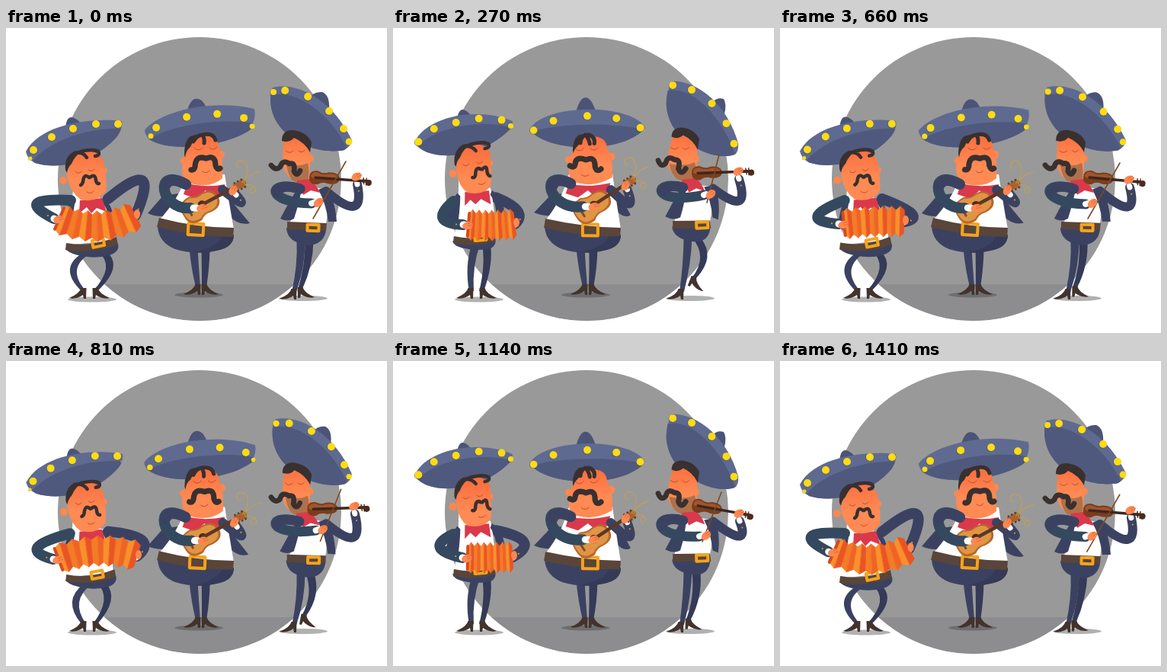
Animation of 500 by 400 pixels, one loop 1440 ms. Source, as an HTML page with a canvas:

```html
<!DOCTYPE html>
<html lang="en">
<head>
<meta charset="utf-8">
<title>Mariachi trio</title>
<style>
html, body { margin: 0; height: 100%; overflow: hidden; background: #fff; }
canvas { display: block; }
</style>
</head>
<body>
<canvas id="stage" width="500" height="400"></canvas>
<script>
const ctx = document.getElementById('stage').getContext('2d');
const LOOP = 1440, STEP = 30, TAU = Math.PI * 2;
const NAVY = '#3b4261', DEEP = '#343a57', TEAL = '#34495f', SKIN = '#ff8750', HAIR = '#393030',
  RED = '#d9394b', BELT = '#594539', GOLD = '#f6a31c', BOOT = '#42332c', WHITE = '#fff';
let sway = 0; // 0 = leaning pose, 1 = upright pose

const lerp = (a, b, k = sway) => a + (b - a) * k;

// Blend two paths that share the same commands.
function blend(a, b) {
  const to = b.match(/-?[\d.]+/g);
  let i = 0;
  return new Path2D(a.replace(/-?[\d.]+/g, v => lerp(+v, +to[i++]).toFixed(2)));
}
function fill(color, a, b = a) {
  ctx.fillStyle = color;
  ctx.fill(blend(a, b));
}
function line(color, width, a, b = a) {
  ctx.strokeStyle = color;
  ctx.lineWidth = width;
  ctx.stroke(blend(a, b));
}
function oval(color, x, y, rx, ry = rx, turn = 0) {
  ctx.fillStyle = color;
  ctx.beginPath();
  ctx.ellipse(x, y, rx, ry, turn, 0, TAU);
  ctx.fill();
}
function at(x, y, turn, draw, flip = 1) {
  ctx.save();
  ctx.translate(x, y);
  ctx.rotate(turn);
  ctx.scale(flip, 1);
  draw();
  ctx.restore();
}

// Smooth looping curve through rows of [time, ...values].
function track(rows, t) {
  const n = rows.length;
  const row = i => {
    const wraps = Math.floor(i / n), r = rows[i - wraps * n];
    return [r[0] + wraps * LOOP, ...r.slice(1)];
  };
  let i = n - 1;
  while (rows[i][0] > t) i--;
  const [p, a, b, q] = [i - 1, i, i + 1, i + 2].map(row);
  const d = b[0] - a[0], s = (t - a[0]) / d, s2 = s * s, s3 = s2 * s;
  return a.map((v, j) => {
    const va = (b[j] - p[j]) / (b[0] - p[0]) * d, vb = (q[j] - v) / (q[0] - a[0]) * d;
    return v * (2 * s3 - 3 * s2 + 1) + va * (s3 - 2 * s2 + s) + b[j] * (3 * s2 - 2 * s3) + vb * (s3 - s2);
  }).slice(1);
}

// Tapered leg from hip over knee to ankle.
function leg(color, ...poses) {
  fill(color, ...poses.map(([hx, hy, kx, ky, ax, ay]) =>
    `M${hx - 5.5} ${hy}Q${kx - 5} ${ky} ${ax - 3} ${ay}L${ax + 3} ${ay}Q${kx + 5} ${ky} ${hx + 5.5} ${hy}Z`));
}
function boot(x, y, flip, turn = 0) {
  at(x, y, turn, () => fill(BOOT, 'M-3.5 0L3.5 0Q5 7 19 13Q12 15 4 11L1 9L0 14L-3 14Z'), flip);
}
function shadow(x, y) {
  oval('rgba(60,60,60,.4)', x, y, 32, 3.4);
}
function buckle(x, y, w, h, turn) {
  at(x, y, turn, () => {
    ctx.strokeStyle = GOLD;
    ctx.lineWidth = 4;
    ctx.strokeRect(-w / 2 + 2, -h / 2 + 2, w - 4, h - 4);
  });
}
function hand(x, y, turn = 0) {
  oval(SKIN, x, y, 7, 5, turn);
  at(x, y, turn, () => line('#e0602f', .8, 'M1 -2L6 -2M1 1L7 1'));
}
function sleeve(color, sx, sy, cx, cy, hx, hy, width) {
  line(color, width, `M${sx} ${sy}Q${cx} ${cy} ${hx} ${hy}`);
  const d = Math.hypot(hx - cx, hy - cy), ux = (hx - cx) / d, uy = (hy - cy) / d;
  line(WHITE, width - 5, `M${hx} ${hy}L${hx + ux * 2} ${hy + uy * 2}`);
  oval(GOLD, hx - ux * 9, hy - uy * 9, 1);
}
function hat(crown, brim, under, balls) {
  fill('#4b5477', ...crown);
  fill('#5f6a91', ...brim);
  fill('#4f597d', ...under);
  for (const [ax, ay, bx, by, ra = 5, rb = 5] of balls) {
    const x = lerp(ax, bx), y = lerp(ay, by), r = lerp(ra, rb);
    oval('rgba(40,45,70,.3)', x - .8, y + .6, r);
    oval('#ffdb12', x, y, r);
  }
}
function face(top, bottom, a, b) {
  const tone = ctx.createLinearGradient(0, top, 0, bottom);
  tone.addColorStop(0, '#fb6c3d');
  tone.addColorStop(.6, '#ff8a53');
  fill(tone, a, b);
}
function features(a, b) {
  line('#b9502c', 1, a, b);
}

const squeeze = [ // left end, middle, right end, left elbow, right elbow
  [0, 70, 250, 120, 260, 170, 246, 8, 222, 205, 165],
  [270, 99, 258, 130, 259, 160, 257, 45, 256, 179, 240],
  [510, 101, 257, 129, 258, 156, 254, 43, 252, 188, 241],
  [660, 84, 257, 124, 254, 163, 254, 18, 252, 197, 248],
  [810, 69, 260, 121, 249, 172, 256, 10, 246, 203, 230],
  [960, 76, 262, 124, 249, 168, 262, 19, 253, 188, 239],
  [1140, 98, 258, 128, 258, 157, 257, 38, 246, 197, 235]
];

function accordion(lx, ly, mx, my, rx, ry) {
  const cx = 2 * mx - (lx + rx) / 2, cy = 2 * my - (ly + ry) / 2, n = 14;
  const colors = ['#f9902b', '#ea5424', '#f47c27', '#ef6425'];
  const rib = i => {
    const s = i / n, r = 1 - s;
    const x = r * r * lx + 2 * r * s * cx + s * s * rx, y = r * r * ly + 2 * r * s * cy + s * s * ry;
    const dx = r * (cx - lx) + s * (rx - cx), dy = r * (cy - ly) + s * (ry - cy), d = Math.hypot(dx, dy);
    const h = 17 + (i % 2 ? 3 : -2);
    return [x + dy / d * h, y - dx / d * h, x - dy / d * h, y + dx / d * h];
  };
  for (let i = 0; i < n; i++) {
    const a = rib(i), b = rib(i + 1);
    const quad = `M${a[0]} ${a[1]}L${b[0]} ${b[1]}L${b[2]} ${b[3]}L${a[2]} ${a[3]}Z`;
    fill(colors[i % 4], quad);
    line(colors[i % 4], .6, quad);
  }
  const [x1, y1, x2, y2] = rib(0);
  line('#d8481f', 4, `M${x1} ${y1}L${x2} ${y2}`);
}

function accordionist(t) {
  const [lx, ly, mx, my, rx, ry, ex, ey, fx, fy] = track(squeeze, t);
  shadow(113, 356);
  leg(NAVY, [108, 294, 72, 314, 102, 345], [109, 282, 102, 312, 103, 345]);
  leg(DEEP, [126, 293, 150, 312, 117, 345], [122, 282, 124, 310, 116, 345]);
  boot(102, 341, -1);
  boot(117, 341, 1);
  hat(['M78 135Q78 117 86 117Q93 118 101 128Z', 'M84 123Q86 105 93 106Q99 107 106 118Z'],
    ['M26 162C45 125 115 117 152 122Q154 130 146 142C120 172 75 188 38 177Q28 172 26 162Z',
     'M28 149C45 112 115 102 157 122Q159 126 154 132C125 161 78 173 45 161Q35 158 28 149Z'],
    ['M35 174C60 145 115 130 151 132Q150 136 146 142C120 172 75 188 38 177Z',
     'M32 153C55 128 115 118 156 130Q157 130 154 132C125 161 78 173 45 161Z'],
    [[32, 171, 30, 158, 2.5, 0], [36, 160, 33, 148], [60, 143, 53, 131], [88, 132, 82, 123],
     [118, 126, 112, 118], [147, 126, 142, 120], [150, 133, 155, 128, 0, 4]]);
  sleeve(NAVY, lerp(134, 135), lerp(224, 222), fx, fy, rx, ry, 14);
  fill(WHITE, 'M88 212L128 224Q140 250 143 278L80 285Q86 245 88 212Z', 'M86 198L128 208Q134 240 133 274L80 278Q86 240 86 198Z');
  fill(NAVY, 'M128 222Q139 232 142 250L136 252Q133 235 124 226Z', 'M130 212Q145 220 148 246L136 252Q136 228 128 218Z');
  fill(NAVY, 'M88 222Q78 235 77 262L86 266Q88 240 91 226Z', 'M84 216Q70 232 66 254L84 262Q88 240 88 220Z');
  fill(NAVY, 'M78 289Q112 297 147 283Q150 293 136 298Q118 303 100 299Q82 296 78 289Z', 'M78 278Q105 286 133 276Q134 285 127 288Q110 292 95 288Q80 286 78 278Z');
  fill(BELT, 'M79 282Q110 288 145 274L147 284Q112 297 78 291Z', 'M80 272Q105 278 132 270L133 279Q105 287 79 281Z');
  buckle(lerp(121, 114), lerp(282, 273), 19, 13, lerp(-.2, -.08));
  fill(RED, 'M97 226L126 223L132 241L119 236L112 243L106 235L96 243Z', 'M94 214L126 212L128 230L115 223L108 230L101 224L94 232Z');
  oval(SKIN, lerp(75, 79), lerp(200, 190), 5);
  oval(SKIN, lerp(129, 127), lerp(187, 176), 4);
  face(155, 225, 'M79 184Q82 164 104 162Q122 160 128 175Q133 205 131 214Q120 230 98 225Q84 215 80 195Z', 'M82 176Q84 153 106 152Q123 150 127 162Q130 190 128 206Q120 219 98 215Q87 208 84 190Z');
  fill(HAIR, 'M78 186Q76 169 89 162L101 160Q90 168 86 178Q81 183 80 190Z', 'M81 178Q79 160 92 152L104 150Q92 158 88 169Q84 173 83 181Z');
  line(HAIR, 4.5, 'M90 164Q101 162 106 170M98 162Q115 158 121 162Q124 167 117 168', 'M93 154Q104 153 109 160M101 152Q118 147 126 151Q128 156 121 157');
  features('M91 188Q95 193 99 188M108 186Q112 190 116 185', 'M92 178Q96 182 100 177M110 175Q114 179 118 174');
  line(HAIR, 4.5, 'M109 196Q102 190 101 202Q100 205 98 206M110 196Q117 190 118 200Q119 205 122 204',
    'M116 184Q109 180 109 192Q108 196 105 195M118 184Q124 177 124 187Q125 192 128 193');
  features('M106 215Q111 219 115 214', 'M113 203Q118 206 122 201');
  sleeve(TEAL, lerp(85, 79), lerp(226, 227), ex, ey, lx - 7, ly, 14);
  accordion(lx, ly, mx, my, rx, ry);
  hand(lx - 1, ly + 1, -.3);
  oval(SKIN, rx + 2, ry - 2, 4, 6);
}

function guitar() {
  fill('#b5662f', 'M-28 2Q-30 -17 -10 -17Q-2 -12 5 -14Q24 -15 24 1Q23 15 6 14Q-2 12 -9 18Q-28 20 -28 2Z');
  fill('#df9544', 'M-26 1Q-28 -15 -10 -15Q-2 -10 5 -12Q21 -13 21 1Q20 12 6 12Q-2 10 -9 15Q-26 17 -26 1Z');
  oval('#4a2c20', 0, 0, 5.5);
  line('#5b3826', 4.5, 'M0 0L50 -1');
  line('#7d4c2b', 3, 'M-18 -5L-18 6');
  fill('#a8622f', 'M48 -5L63 -6L66 -2L63 5L48 3Z');
  for (const x of [51, 56, 61]) {
    oval('#57402e', x, -6, 1.4);
    oval('#57402e', x, 5, 1.4);
  }
  line('#c8a344', .9, 'M60 -2Q78 -10 76 -24Q70 -33 64 -26Q62 -20 68 -21M62 0Q72 -9 88 -4M62 2Q76 8 71 16Q64 18 65 12Q68 8 71 11');
}

function guitarist(bounce) {
  shadow(253, 350);
  leg(NAVY, [246, 289, 248, 315, 252, 340], [246, 289, 248, 315, 252, 340]);
  leg(DEEP, [262, 289, 262, 315, 260, 340], [263, 289, 263, 315, 260, 340]);
  boot(252, 336, -1);
  boot(260, 336, 1);
  ctx.save();
  ctx.translate(0, bounce);
  hat(['M237 113Q241 93 250 93Q259 93 264 108Z', 'M240 113Q245 92 253 92Q261 92 267 113Z'],
    ['M182 134C198 113 262 92 326 106Q329 118 320 134C290 155 215 165 188 146Q182 140 182 134Z',
     'M179 134C196 99 314 99 331 133Q331 134 329 135C300 165 210 165 181 136Q179 136 179 134Z'],
    ['M188 146C208 130 280 117 324 125Q324 129 320 134C290 155 215 165 188 146Z',
     'M181 136C210 125 300 125 329 135Q329 135 329 135C300 165 210 165 181 136Z'],
    [[190, 142, 184, 134, 3.5], [197, 131, 212, 121.5], [237, 117, 257, 116],
     [277, 113, 295, 120], [312, 118, 326, 133], [323, 129, 331, 137, 3.5, 0]]);
  ctx.restore();
  fill(NAVY, 'M206 220L186 243Q200 250 222 245L240 215Z', 'M206 220L185 242Q200 249 218 244L232 215Z');
  fill(NAVY, 'M282 204Q296 212 300 232L320 256Q306 260 292 246Z', 'M280 205Q300 212 304 230L311 244Q303 250 292 238Z');
  fill(WHITE, 'M238 192L287 192Q292 225 299 264Q250 270 201 252Q226 225 238 192Z', 'M231 188L288 190Q292 220 299 264Q250 270 200 252Q222 225 231 188Z');
  fill(NAVY, 'M199 260Q248 274 299 271Q299 288 276 292Q248 298 222 290Q200 281 199 260Z');
  fill(DEEP, 'M299 271Q299 288 276 292Q262 296 246 294Q278 288 284 272Z');
  fill(BELT, 'M201 249Q250 262 299 262L298 274Q250 274 198 261Z', 'M200 250Q250 261 299 262L298 273Q250 274 198 262Z');
  buckle(lerp(249, 260), lerp(264, 265), 24, 19, lerp(.06, 0));
  fill(RED, 'M238 204Q262 210 287 205L289 216L272 222L262 213L250 224L233 218Z', 'M230 204Q253 210 285 203L281 216L266 222L255 213L242 222L226 217Z');
  oval(SKIN, lerp(282, 287), lerp(166, 169), 5);
  oval(SKIN, lerp(233, 230), lerp(174, 172), 4.5);
  face(140, 205, 'M235 162Q236 142 258 141Q278 140 280 158Q285 170 284 197Q268 211 242 204Q231 200 231 182Z', 'M237 160Q236 142 260 142Q281 142 281 158Q290 170 288 196Q262 211 235 201Q229 198 231 172Z');
  fill(HAIR, 'M234 166Q234 148 242 142L256 138Q245 148 242 156Q236 160 235 170Z', 'M236 160Q236 146 244 140L258 138Q247 146 243 154Q238 158 237 164Z');
  line(HAIR, 5, 'M246 149Q250 141 258 140Q261 146 260 151M258 140Q272 137 275 147', 'M246 151Q246 143 252 140Q257 146 258 152M256 140Q265 143 263 152');
  features('M247 157Q253 163 258 157M267 157Q272 162 277 156', 'M239 159Q244 164 249 158M258 158Q263 163 268 157');
  line(HAIR, 7.2, 'M262 171Q249 166 248 182Q247 187 243 186M263 171Q275 166 275 180Q277 187 281 184',
    'M252 173Q239 168 238 178Q237 184 231 180M253 173Q264 168 264 182Q266 190 272 185');
  features('M258 188Q263 192 267 187', 'M246 193Q251 197 256 193');
  sleeve(NAVY, lerp(284, 286), 212, 322, lerp(242, 250), lerp(302, 308), lerp(219, 211), 12);
  at(lerp(257, 264), lerp(232, 233) + bounce, lerp(-.47, -.57), guitar);
  line(TEAL, 14, 'M236 205C192 180 203 240 242 236', 'M233 204C190 182 203 240 250 234');
  line(NAVY, 14, 'M236 205Q214 194 209 207', 'M233 204Q213 195 209 208');
  line(WHITE, 9, 'M246 236L250 236', 'M253 234L257 234');
  hand(lerp(257, 264), lerp(236, 234), -.3);
  hand(lerp(298, 306), lerp(213, 206), -1);
}

const bowing = [ // violin, tilt, bow tip, bow heel, bowing hand, neck hand, raised foot
  [0, 418, 197, .07, 446, 175, 403, 250, 410, 229, 460, 195, 0],
  [270, 412, 190, -.04, 428, 166, 412, 229, 417, 218, 453, 188, 1],
  [510, 415, 198, .33, 438, 189, 399, 246, 404, 239, 455, 210, 1],
  [660, 418, 197, .09, 446, 177, 404, 250, 410, 230, 458, 199, .1],
  [960, 412, 191, -.07, 432, 163, 418, 224, 419, 216, 455, 186, 1],
  [1140, 412, 192, .18, 431, 172, 406, 237, 411, 229, 454, 200, .15]
];

function violin() {
  fill('#7b3d1c', 'M-20 0Q-20 -10 -9 -9Q-2 -5 5 -8Q19 -9 20 0Q19 8 5 7Q-2 4 -9 9Q-20 10 -20 0Z');
  fill('#a1552a', 'M-18 -1Q-18 -8 -9 -7Q-2 -3 5 -6Q17 -7 18 -1Q10 2 -2 0Q-12 4 -18 -1Z');
  line('#3c2720', 3.5, 'M-12 0L52 0');
  line('#4c2a1c', 4, 'M50 0L57 0Q61 -1 60 3Q58 5 56 3');
  line('#4c2a1c', 1.4, 'M51 -4L52 4M55 -4L55 5');
}

function violinist(t) {
  const [vx, vy, tilt, bx, by, hx, hy, px, py, nx, ny, lift] = track(bowing, t);
  shadow(390, 354.5);
  const base = sway;
  sway = lift;
  leg(DEEP, [398, 278, 398, 312, 386, 342], [398, 275, 419, 300, 395, 328]);
  boot(lerp(386, 395), lerp(340, 326), 1, lerp(0, .4));
  sway = base;
  leg(NAVY, [387, 278, 388, 312, 378, 346], [387, 273, 386, 310, 379, 346]);
  boot(378, 342, -1);
  hat(['M398 91Q405 83 415 84Q425 88 424 106Z', 'M422 98Q428 91 436 94Q440 100 436 115Z'],
    ['M350 78C380 70 428 92 454 147Q453 155 444 160C405 168 346 142 347 92Q346 85 350 78Z',
     'M368 69C400 68 440 100 453 152Q454 165 448 167C425 176 362 152 360 100Q359 85 368 69Z'],
    ['M348 88C380 80 426 112 447 157Q446 158 444 160C405 168 346 142 347 92Z',
     'M362 82C390 74 430 112 449 165Q449 166 448 167C425 176 362 152 360 100Z'],
    [[351, 84, 369, 74, 4], [366, 82, 395, 81], [396, 90, 421, 100],
     [424, 109, 439, 127], [443, 132, 448, 154], [450, 149, 450, 162, 4.5, 0]]);
  sleeve(NAVY, 420, lerp(214, 210), lerp(472, 470), lerp(258, 248), nx + 1, ny + 10, 12);
  fill(WHITE, 'M386 205L420 212Q424 235 420 258L372 257Q384 230 386 205Z', 'M382 202L418 208Q420 235 415 256L368 255Q380 230 382 202Z');
  fill(NAVY, 'M386 205Q373 225 360 250Q370 255 378 250Q386 225 388 210Z', 'M380 205Q367 228 357 247Q368 253 377 248Q384 225 384 208Z');
  fill(NAVY, 'M410 212Q420 230 423 254L434 254Q432 225 420 208Z', 'M408 208Q417 225 419 248L426 251Q430 225 422 206Z');
  fill(NAVY, 'M368 262L420 265Q418 280 404 284Q392 286 384 282Q369 277 368 262Z', 'M366 260L416 259Q416 275 404 279Q392 281 382 277Q367 272 366 260Z');
  fill(BELT, 'M369 254L421 256L420 266L369 264Z', 'M367 253L415 252L417 262L367 263Z');
  buckle(lerp(403, 406), lerp(262, 258), 19, 12, lerp(.03, -.05));
  oval(SKIN, lerp(399, 397), lerp(171, 172), 5);
  face(135, 200, 'M364 148Q372 136 396 146Q402 175 397 200Q385 204 375 198Q364 190 363 175Z', 'M367 142Q378 133 398 142Q401 165 397 196Q385 202 372 196Q360 188 359 172Z');
  fill('#b0714a', 'M368 180Q387 182 396 177Q399 190 396 201Q385 206 376 200Q370 193 368 180Z', 'M362 178Q384 182 396 176Q399 187 396 198Q384 203 373 198Q364 192 362 178Z');
  fill(RED, 'M382 200L398 198Q408 206 412 216L400 213L390 219L387 210L379 214Z', 'M379 199L397 197Q405 203 409 214L398 210L388 215L384 207L376 211Z');
  fill(HAIR, 'M362 148Q362 134 376 134Q395 136 401 150L399 163Q392 150 378 144Q372 151 362 148Z', 'M366 142Q366 130 380 130Q396 132 402 145L400 159Q394 146 381 140Q374 146 366 142Z');
  features('M367 161Q372 166 377 161M384 161Q388 165 392 160', 'M364 156Q369 161 374 156M380 157Q384 161 388 156');
  line(HAIR, 6.8, 'M372 178Q363 172 360 182Q354 188 348 180M372 178Q380 176 378 188Q382 196 386 187',
    'M369 172Q360 166 358 176Q352 184 348 173M369 172Q378 172 374 184Q378 194 384 184');
  at(vx, vy, tilt, violin);
  hand(nx, ny, -.5);
  line('#7a4a26', 1.6, `M${bx} ${by}L${hx} ${hy}`);
  const cuff = `${px - 9} ${py + 1}`;
  line(TEAL, 13, `M386 211C340 198 342 230 ${cuff}`, `M380 209C338 198 340 234 ${cuff}`);
  line(NAVY, 13, 'M386 211Q362 204 355 215', 'M380 209Q359 204 353 215');
  line(WHITE, 8, `M${cuff}L${px - 6} ${py}`);
  hand(px, py, -.7);
}

function draw(now) {
  const t = Math.floor(now % LOOP / STEP) * STEP, phase = TAU * (t + 15) / 720;
  sway = (1 - Math.cos(phase)) / 2;
  ctx.lineCap = ctx.lineJoin = 'round';
  oval(WHITE, 250, 200, 500);
  oval('#999', 254, 198, 186);
  ctx.save();
  ctx.beginPath();
  ctx.rect(0, 336, 500, 64);
  ctx.clip();
  oval('#8d8d8f', 254, 198, 186);
  ctx.restore();
  accordionist(t);
  guitarist(-1.2 * Math.sin(phase));
  violinist(t);
  requestAnimationFrame(tick);
}
const start = performance.now();
const tick = () => draw(performance.now() - start);
tick();
</script>
</body>
</html>
```
